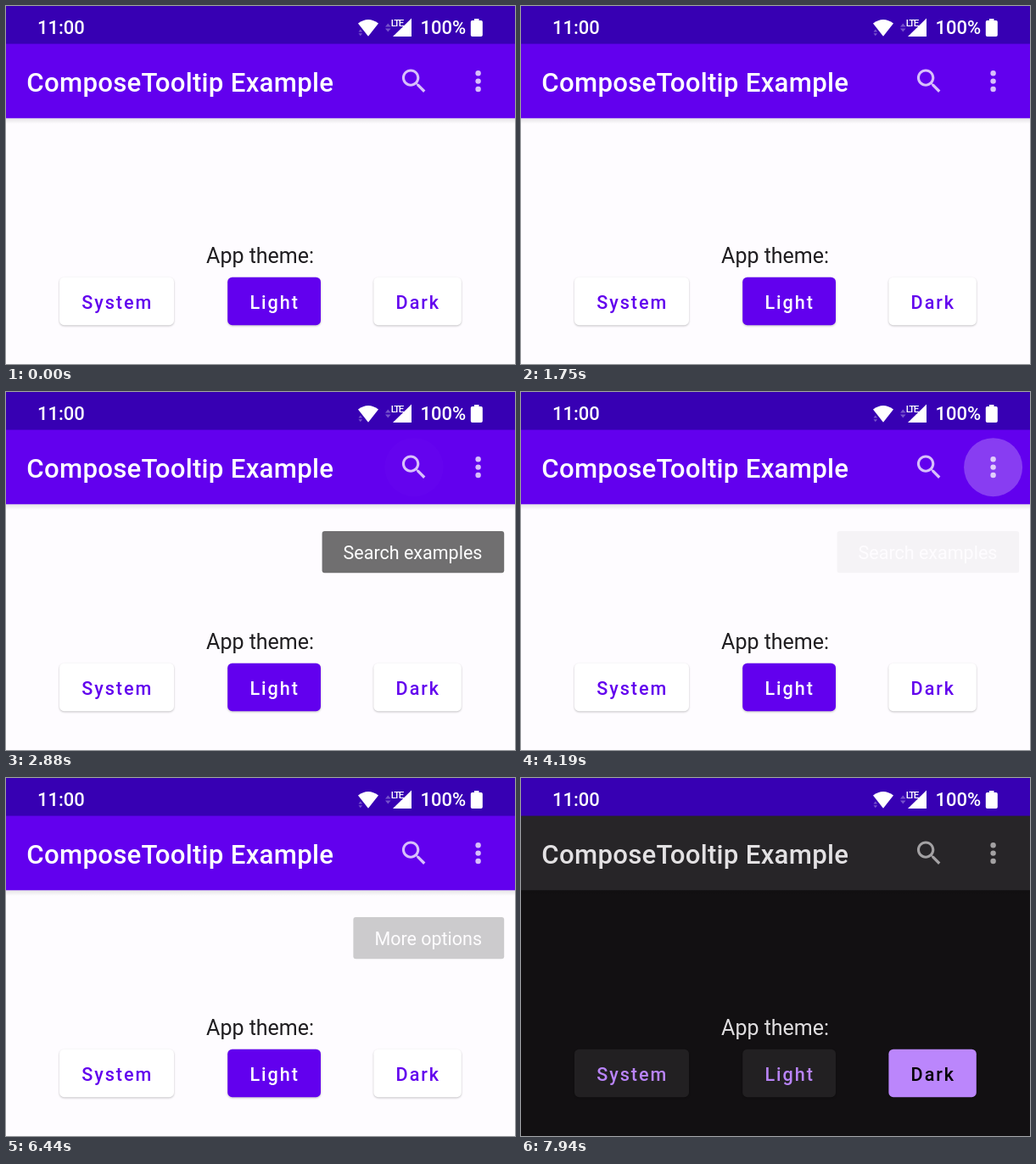
An HTML page that plays this animation: 600 by 422 pixels, repeating every 8000 ms.

```html
<!DOCTYPE html>
<html lang="en">
<head>
<meta charset="utf-8">
<title>Tooltip example</title>
<style>
  html, body { margin: 0; width: 100%; height: 100%; overflow: hidden; }
  svg { display: block; width: 100vw; height: 100vh; font-family: Roboto, sans-serif; }
  .medium { font-weight: 500; }
  .title { font-size: 31.2px; letter-spacing: .27px; }
  .status { font-size: 22px; }
  .lte { font-size: 11.5px; letter-spacing: -1.6px; }
  .label { font-size: 25px; }
  .button { font-size: 21.6px; letter-spacing: 1.96px; }
  .tip { font-size: 21.5px; }
  .raised { filter: drop-shadow(0 1.2px 1.3px rgba(0, 0, 0, .24)); }
</style>
</head>
<body>
<svg id="stage" viewBox="0 0 600 422">
  <defs>
    <linearGradient id="shade" x2="0" y2="1">
      <stop stop-opacity=".1"/>
      <stop offset="1" stop-opacity="0"/>
    </linearGradient>
  </defs>
  <g id="light"></g>
  <g id="dark" opacity="0"></g>
  <g id="statusBar" fill="#fff">
    <rect width="600" height="44.6" fill="#3700b3"/>
    <text class="status medium" x="37" y="33">11:00</text>
    <path d="M415 20.5Q427 11.5 439 20.5L427 35.7Z"/>
    <path d="M456 36L478 14.5V36Z"/>
    <text class="lte medium" x="453.8" y="23.6">LTE</text>
    <path fill="#7652cb" d="M415.5 30.5l2.3-3 2.3 3zm0 1.8h4.6l-2.3 3zM447 24.5l3.3-4 3.3 4zm0 2h6.6l-3.3 4z"/>
    <text class="status medium" x="488.6" y="33">100%</text>
    <path d="M552 15h5.5v2h2.5q1.8 0 1.8 1.8v15.4q0 1.8-1.8 1.8h-10.4q-1.8 0-1.8-1.8V18.8q0-1.8 1.8-1.8h2.4z"/>
  </g>
  <g id="ripples" fill="#fff"></g>
  <g id="tips"></g>
</svg>
<script>
const LOOP = 8000;
const $ = id => document.getElementById(id);

const themes = {
  light: {
    page: '#fefcff', bar: '#6200ee', title: '#fff', icon: '#d8bffb', label: '#1f1d20',
    button: '#fff', accent: '#6200ee', active: '#6200ee', onActive: '#fff', selected: 'Light'
  },
  dark: {
    page: '#121012', bar: '#272528', title: '#e3e1e3', icon: '#a3a1a3', label: '#e0dee0',
    button: '#222022', accent: '#b984f9', active: '#bb86fc', onActive: '#000', selected: 'Dark'
  }
};

const buttons = [['System', 63, 135], ['Light', 261.2, 109.8], ['Dark', 433.4, 103.4]];

function buttonMarkup([name, x, width], theme) {
  const on = name === theme.selected;
  return `<rect class="raised" data-name="${name}" x="${x}" y="319.7" width="${width}" height="56.5" rx="5.5"
      fill="${on ? theme.active : theme.button}"/>
    <text class="button medium" x="${x + 26.2}" y="356.5" fill="${on ? theme.onActive : theme.accent}">${name}</text>`;
}

function sceneMarkup(theme) {
  return `<rect width="600" height="422" fill="${theme.page}"/>
    <rect y="132" width="600" height="7" fill="url(#shade)"/>
    <rect y="44" width="600" height="88.3" fill="${theme.bar}"/>
    <text class="title medium" x="24.3" y="101" fill="${theme.title}">ComposeTooltip Example</text>
    <g fill="${theme.icon}">
      <path transform="translate(462.2 69.7) scale(1.571)" d="M15.5 14h-.79l-.28-.27C15.41 12.59 16 11.11 16 9.5
        16 5.91 13.09 3 9.5 3S3 5.91 3 9.5 5.91 16 9.5 16c1.61 0 3.09-.59 4.23-1.57l.27.28v.79l5 4.99L20.49 19z
        M9.5 14C7.01 14 5 11.99 5 9.5S7.01 5 9.5 5 14 7.01 14 9.5 11.99 14 9.5 14z"/>
      ${[79.2, 88.6, 98].map(y => `<circle cx="556.6" cy="${y}" r="3.2"/>`).join('')}
    </g>
    <text class="label" x="299.6" y="303" text-anchor="middle" fill="${theme.label}">App theme:</text>
    ${buttons.map(b => buttonMarkup(b, theme)).join('')}`;
}

for (const name in themes) $(name).innerHTML = sceneMarkup(themes[name]);

// steps: [time in ms, keyframe properties]; the first and last poses are held to the loop ends
function track(el, steps) {
  const all = [[0, steps[0][1]], ...steps, [LOOP, steps[steps.length - 1][1]]];
  el.animate(all.map(([t, props]) => ({ offset: t / LOOP, ...props })),
    { duration: LOOP, iterations: Infinity });
}

// critically damped spring between two opacities
function springFade(start, from, to) {
  return Array.from({ length: 21 }, (_, i) => {
    const x = i * .4;
    const rest = i === 20 ? 0 : (1 + x) * Math.exp(-x);
    return [start + i * 20, { opacity: to + (from - to) * rest }];
  });
}

function addTip(text, x, show, hide) {
  $('tips').insertAdjacentHTML('beforeend', `<g opacity="0">
    <rect x="${x}" y="164" width="${587.2 - x}" height="49.3" rx="3" fill="#616161" fill-opacity=".91"/>
    <text class="tip" x="${x + 25}" y="197.3" fill="#fff">${text}</text></g>`);
  track($('tips').lastElementChild, [...springFade(show, 0, 1), ...springFade(hide, 1, 0)]);
}

function addRipple(x, press, release) {
  $('ripples').insertAdjacentHTML('beforeend', `<circle cx="${x}" cy="88.7" r="34.5" opacity="0"/>`);
  const circle = $('ripples').lastElementChild;
  circle.style.transformOrigin = `${x}px 88.7px`;
  track(circle, [
    [press, { opacity: 0 }], [press + 75, { opacity: .24 }],
    [release, { opacity: .24 }], [release + 150, { opacity: 0 }]
  ]);
  track(circle, [
    [press, { transform: 'scale(.5)', easing: 'cubic-bezier(.4, 0, .2, 1)' }],
    [press + 225, { transform: 'scale(1)' }]
  ]);
}

addRipple(481, 2020, 2740);
addRipple(556.6, 3960, 4660);
addTip('Search examples', 372.6, 2520, 3965);
addTip('More options', 409.4, 4460, 6330);

const hold = 'step-end';
track($('dark'), [[6500, { opacity: 0, easing: hold }], [6500, { opacity: 1 }]]);
track($('dark').querySelector('[data-name=Dark]'), [
  [6500, { fill: '#b277fd', easing: hold }],
  [7310, { fill: '#bb86fc' }]
]);
</script>
</body>
</html>
```
